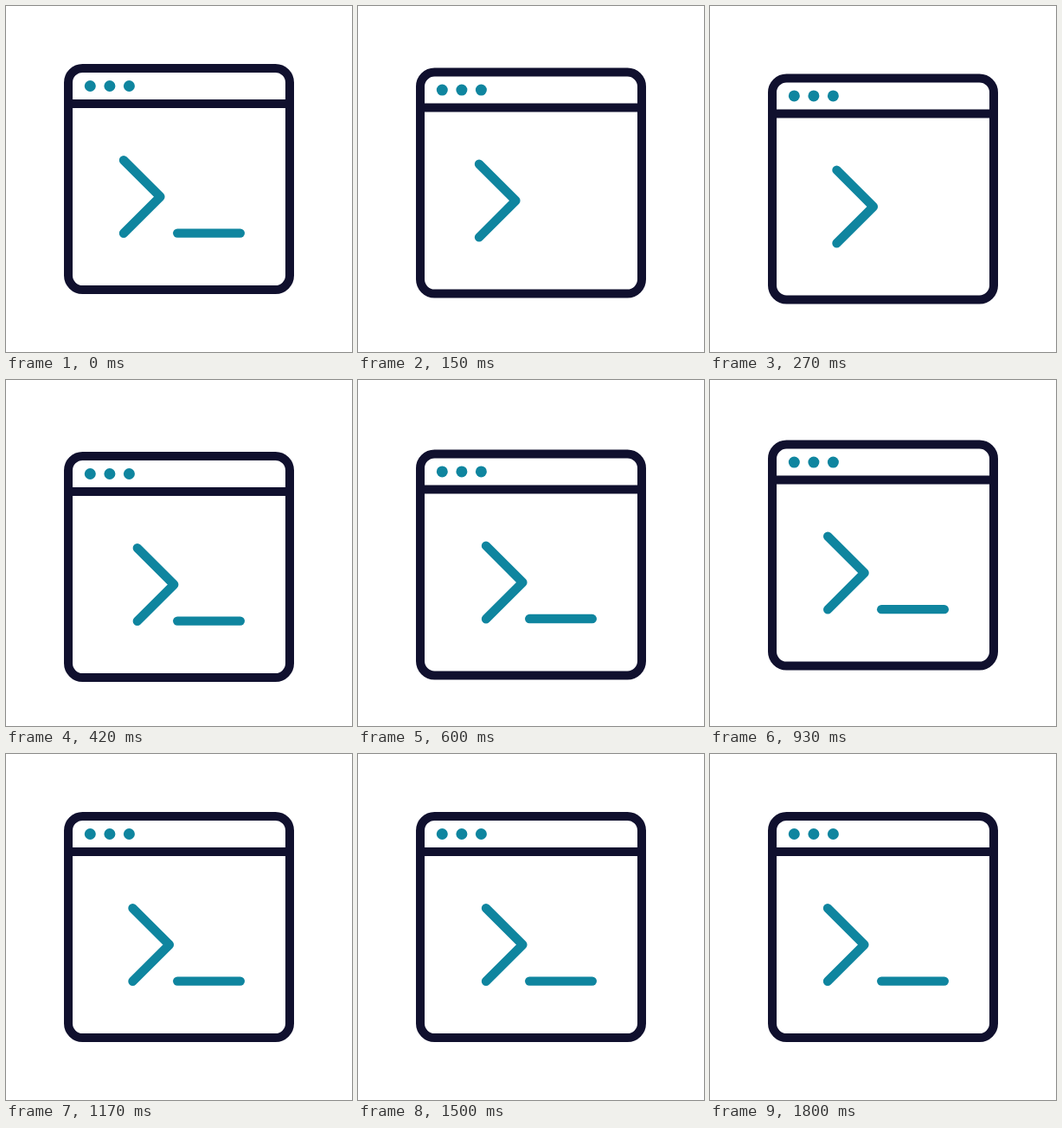
These frames come from a looping animation (400 px wide and 400 px high, 1830 ms). An HTML page:

```html
<!DOCTYPE html>
<html lang="en">
<head>
<meta charset="utf-8">
<title>Terminal</title>
<style>
  html, body { margin: 0; width: 100%; height: 100%; overflow: hidden; background: #fff; }
  svg { display: block; width: 100%; height: 100%; }
</style>
</head>
<body>
<svg viewBox="0 0 400 400" fill="none" stroke-linecap="round" stroke-linejoin="round">
  <g id="terminal">
    <g stroke="#10102e" stroke-width="10">
      <rect x="72" y="72" width="256" height="256" rx="16.5"/>
      <path d="M72 113H328" stroke-linecap="butt"/>
    </g>
    <g fill="#0f859f">
      <circle cx="97.3" cy="92.5" r="6.5"/>
      <circle cx="119.9" cy="92.5" r="6.5"/>
      <circle cx="142.4" cy="92.5" r="6.5"/>
    </g>
    <g stroke="#0f859f" stroke-width="10.4">
      <path id="prompt" d="M136 178.2L178.4 220.5L136 262.8"/>
      <path id="cursor" d="M198.2 262.6H270.8"/>
    </g>
  </g>
</svg>
<script>
  const LOOP = 1830, STEP = 30, TRAVEL = 16;
  const DROP_END = 420, RISE_END = 1110;
  const SWAY = 900, BLINK = 285;
  const [terminal, prompt, cursor] =
    ['terminal', 'prompt', 'cursor'].map(id => document.getElementById(id));

  const ease = p => (1 - Math.cos(Math.PI * Math.min(1, Math.max(0, p)))) / 2;

  function drop(t) {
    return t < DROP_END
      ? TRAVEL * ease(t / DROP_END)
      : TRAVEL * (1 - ease((t - DROP_END) / (RISE_END - DROP_END)));
  }

  const sway = t => TRAVEL * (1 - Math.cos(2 * Math.PI * t / SWAY)) / 2;

  function draw(t) {
    terminal.setAttribute('transform', `translate(0 ${drop(t).toFixed(3)})`);
    prompt.setAttribute('transform', `translate(${sway(t).toFixed(3)} 0)`);
    cursor.setAttribute('visibility', t % BLINK < BLINK / 2 ? 'visible' : 'hidden');
  }

  const start = performance.now();
  function tick() {
    const t = (performance.now() - start) % LOOP;
    draw(Math.floor(t / STEP) * STEP);
    requestAnimationFrame(tick);
  }
  draw(0);
  requestAnimationFrame(tick);
</script>
</body>
</html>
```
